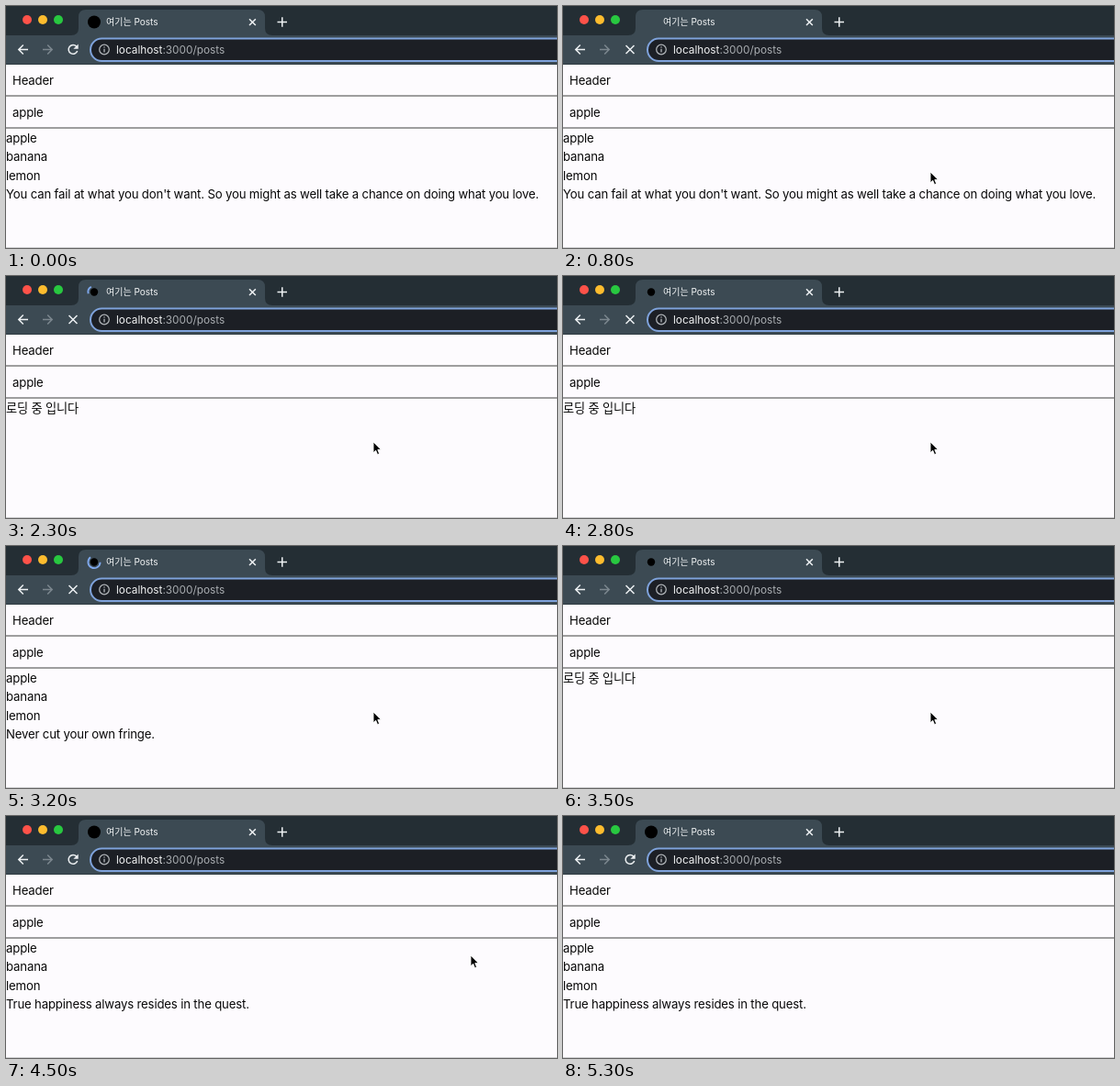
An HTML page for the animation above (5.4 s loop, 600 by 264 pixels).

```html
<!DOCTYPE html>
<html lang="ko">
<head>
<meta charset="utf-8">
<style>
  html, body { margin: 0; width: 100%; height: 100%; overflow: hidden; background: #fdfbfe; }
  svg { display: block; }
  text { font: 13.2px Inter, "Noto Sans CJK KR", "Noto Sans CJK", sans-serif; letter-spacing: -.17px; fill: #080808; white-space: pre; }
  .title { font-size: 10px; letter-spacing: 0; fill: #f3f5f6; }
  .url { font-size: 11.8px; letter-spacing: 0; fill: #f2f3f4; }
  .dim { fill: #a9adb1; }
  .icon { fill: none; stroke: #eef1f3; stroke-width: 1.5; }
</style>
</head>
<body>
<svg width="600" height="264" viewBox="0 0 600 264">
  <rect width="600" height="64" fill="#242e34"/>
  <path d="M0 32H71Q79 32 79 24V12Q79 4 87 4H274Q282 4 282 12V24Q282 32 290 32H600V63.5H0Z" fill="#3c4a53"/>
  <circle cx="23" cy="15" r="5" fill="#fe5249"/>
  <circle cx="40" cy="15" r="5" fill="#fdbc2e"/>
  <circle cx="57" cy="15" r="5" fill="#28c840"/>
  <circle id="favicon" cx="96" cy="17.5" fill="#000"/>
  <path id="spinner" fill="none" stroke="#7fa9ee" stroke-width="1.8"/>
  <text class="title" x="109" y="21">여기는 Posts</text>
  <path class="icon" d="M265 14.2l6.8 6.8m0-6.8l-6.8 6.8M295.5 17.5h10.500m-5.250-5.250v10.500"/>
  <path class="icon" d="M24 47.500H14m4.800-5l-5 5 5 5"/>
  <path class="icon" style="stroke:#7c878e" d="M40 47.500h10m-4.800-5l5 5-5 5"/>
  <g id="reload">
    <path class="icon" d="M76.800 44.200A4.900 4.900 0 1 0 77.700 49"/>
    <path d="M78.700 41.500v5.300h-5.300z" fill="#eef1f3"/>
  </g>
  <path id="stop" class="icon" d="M68.500 43l9 9m0-9l-9 9"/>
  <rect x="92" y="35.500" width="530" height="24.500" rx="12.250" fill="#1c1f25" stroke="#7fa3dc" stroke-width="2"/>
  <circle cx="107" cy="47.500" r="5.300" class="icon" style="stroke:#b4b8bc;stroke-width:1.200"/>
  <path d="M107 46.800v3.700m0-6.200v1.300" stroke="#b4b8bc" stroke-width="1.300"/>
  <text class="url" x="120" y="52">localhost<tspan class="dim">:3000/posts</tspan></text>

  <text x="7" y="86">Header</text>
  <text x="7" y="121">apple</text>
  <path d="M0 98h600M0 133h600" stroke="#3e413f"/>
  <path d="M0 263.500h600" stroke="#d0d0d2"/>
  <text id="loading" x="0" y="148.500">로딩 중 입니다</text>
  <g id="posts">
    <text x="0" y="149">apple</text>
    <text x="0" y="169">banana</text>
    <text x="0" y="189.500">lemon</text>
    <text id="quote" x="0" y="210"></text>
  </g>
  <path id="cursor" d="M0 0V11.800L2.700 9.300 4.500 13.700 6.600 12.800 4.800 8.600H8.500Z" fill="#000" stroke="#fff" stroke-width=".9"/>
</svg>
<script>
const LOOP = 5400, STEP = 100;
const $ = id => document.getElementById(id);
const show = (id, on) => $(id).style.display = on ? '' : 'none';

// press: reload begins, blank: old page goes, ready: new quote, done: spinner stops
const loads = [
  { press: 800, blank: 900, ready: 2500, done: 2500, quote: "It's not about who comes first, it's about who is kindest." },
  { press: 2800, blank: 2800, ready: 3200, done: 3300, quote: 'Never cut your own fringe.' },
  { press: 3400, blank: 3500, ready: 3900, done: 4000, quote: "Don't burn bridges." },
  { press: 4000, blank: 4200, ready: 4400, done: 4500, quote: 'True happiness always resides in the quest.' }
];
const firstQuote = "You can fail at what you don't want. So you might as well take a chance on doing what you love.";

const ease = x => 1 - (1 - x ** 1.8) ** 3.8;

function arc(start, sweep) {
  const point = deg => {
    const a = deg * Math.PI / 180;
    return `${96 + 6.6 * Math.cos(a)} ${17.5 + 6.6 * Math.sin(a)}`;
  };
  return `M${point(start)}A6.6 6.6 0 ${+(sweep > 180)} 1 ${point(start + sweep)}`;
}

// The arc grows to 270 degrees, then its tail catches up, while it all turns
function spinnerPath(age) {
  const half = Math.floor(age / 666), f = ease(age % 666 / 666);
  const tail = half % 2 ? 270 * f : 0;
  const sweep = half % 2 ? 270 - tail : 270 * f;
  return arc(270 + 360 * age / 1568 + 270 * Math.floor(half / 2) + tail, sweep);
}

function cursorAt(t) {
  if (t < 100 || t >= 4700) return null;
  if (t < 600) return [414 - 14 * (t - 100) / 500, 195 - 14 * (t - 100) / 500];
  if (t < 4400) return [400, 181];
  if (t < 4500) return [440, 172];
  return t < 4600 ? [506, 152] : [506, 95];
}

function draw(t) {
  const index = loads.findLastIndex(l => t >= l.press);
  const load = loads[index];
  const busy = !!load && t < load.done;
  const blank = !!load && t >= load.blank && t < load.ready;
  const old = index > 0 ? loads[index - 1].quote : firstQuote;

  show('reload', !busy);
  show('stop', busy);
  show('loading', blank);
  show('posts', !blank);
  $('quote').textContent = load && t >= load.ready ? load.quote : old;

  show('favicon', !load || t >= load.blank);
  $('favicon').setAttribute('r', busy ? 4.2 : 7);
  show('spinner', busy && t > load.blank);
  if (busy) $('spinner').setAttribute('d', spinnerPath(t - load.press));

  const at = cursorAt(t);
  show('cursor', at);
  if (at) $('cursor').setAttribute('transform', `translate(${at})`);
}

function tick() {
  draw(Math.floor(performance.now() % LOOP / STEP) * STEP);
  requestAnimationFrame(tick);
}
tick();
</script>
</body>
</html>
```
